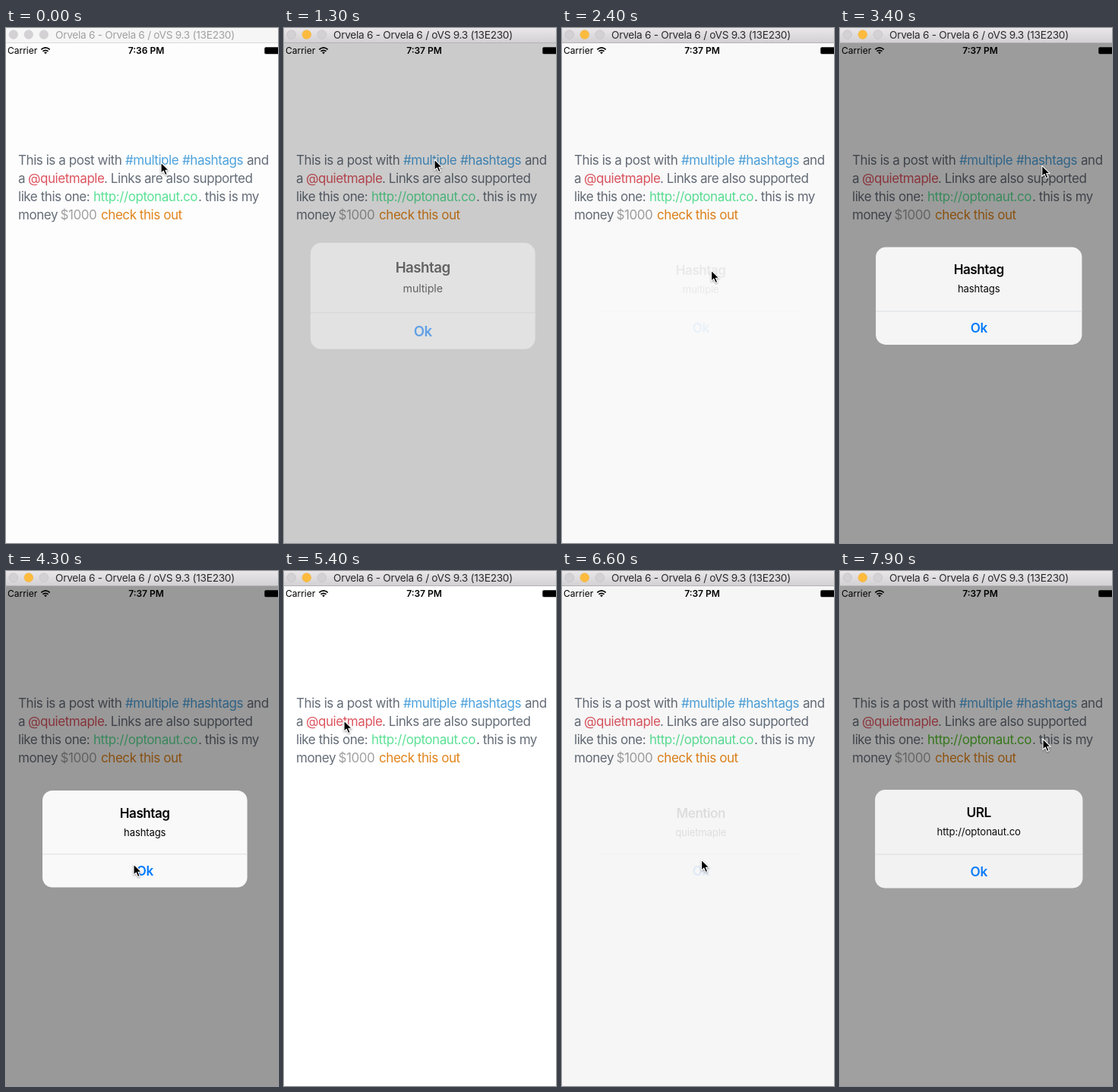
An HTML page that plays this animation: 358 px wide and 678 px high, repeating every 8000 ms.

```html
<!DOCTYPE html>
<html lang="en">
<head>
<meta charset="utf-8">
<style>
  html, body { margin: 0; width: 100%; height: 100%; overflow: hidden; background: #fff; }
  svg { display: block; font-family: Inter, Roboto, sans-serif; }
  text { white-space: pre; }
  #post { font-size: 17px; letter-spacing: -.44px; fill: #656d78; }
  #post .tag { fill: #4ea2dc; }
  #post .mention { fill: #dd5560; }
  #post .url { fill: #5ce196; }
  #post .money { fill: #a0a0a0; }
  #post .link { fill: #e1841c; }
  #title { font-size: 13.6px; letter-spacing: -.25px; }
  #status { font-size: 12px; }
  #alert { text-anchor: middle; }
  #alert .big { font-size: 17px; font-weight: 600; letter-spacing: -.43px; }
  #message { font-size: 13px; letter-spacing: -.1px; }
</style>
</head>
<body>
<svg width="358" height="678" viewBox="0 0 358 678">
  <defs>
    <linearGradient id="bar" x2="0" y2="1">
      <stop stop-color="#e9e7e9"/><stop offset="1" stop-color="#d2d0d2"/>
    </linearGradient>
  </defs>
  <rect id="screen" width="358" height="678"/>

  <g id="post">
    <text x="16" y="179.5">This is a post with</text>
    <text x="157" y="179.5" class="tag">#multiple</text>
    <text x="232" y="179.5" class="tag">#hashtags</text>
    <text x="317" y="179.5">and</text>
    <text x="16" y="203.7">a</text>
    <text x="29" y="203.7" class="mention">@quietmaple</text>
    <text x="129" y="203.7">. Links are also supported</text>
    <text x="16" y="227.9">like this one:</text>
    <text x="115" y="227.9" class="url" id="url">http://optonaut.co</text>
    <text x="253" y="227.9">. this is my</text>
    <text x="16" y="252">money</text>
    <text x="71.6" y="252" class="money">$1000</text>
    <text x="125" y="252" class="link">check this out</text>
  </g>

  <rect id="dim" y="20" width="358" height="658"/>

  <g id="status">
    <text x="2" y="34">Carrier</text>
    <g fill="none" stroke="#000" stroke-width="1.7">
      <path d="M46.3 28.3q5.7-4.8 11.4 0M48.4 30.7q3.6-2.8 7.2 0"/>
      <path d="M52 34.3l-2-2.2q2-1.3 4 0z" fill="#000" stroke="none"/>
    </g>
    <text id="clock" x="184.5" y="34" text-anchor="middle" font-weight="600"></text>
    <rect x="340.5" y="25.5" width="24" height="8.5" rx="1.5" stroke="#000" stroke-opacity=".45"/>
  </g>

  <rect id="titlebar" width="358" height="19.5"/>
  <path id="edge" d="M0 19.5H358"/>
  <g id="lights">
    <circle cx="9.8" cy="8.6" r="5.8"/>
    <circle cx="29.8" cy="8.6" r="5.8"/>
    <circle cx="49.8" cy="8.6" r="5.8"/>
  </g>
  <text id="title" x="65" y="14">Orvela 6 - Orvela 6 / oVS 9.3 (13E230)</text>

  <g id="alert">
    <rect x="48" y="289" width="269.5" height="127.5" rx="13" fill="#f9f9f9"/>
    <path d="M48 372.8H317.5" stroke="#dedfe4" stroke-width="1"/>
    <text id="heading" class="big" x="182.7" y="324.5"></text>
    <text id="message" x="182.7" y="348.5"></text>
    <text class="big" x="182.7" y="401" fill="#007aff">Ok</text>
  </g>

  <path id="cursor" d="M0 0V14.2L3.3 11.2L5.6 16.6L8.2 15.5L5.9 10.3H10.4Z"
    stroke="#fff" stroke-width="1.1" stroke-linejoin="round"
    style="filter: drop-shadow(0 1px 1px rgba(0,0,0,.35))"/>
</svg>
<script>
const $ = id => document.getElementById(id);
const LOOP = 8000, ACTIVE_AT = 1000, URL_PRESS = 7620;

// opening time, closing time, heading, message
const alerts = [
  [1215, 2175, 'Hashtag', 'multiple'],
  [3140, 4400, 'Hashtag', 'hashtags'],
  [5420, 6402, 'Mention', 'quietmaple'],
  [7685, 9000, 'URL', 'http://optonaut.co']
];

// time, x, y of the pointer tip
const path = [
  [0, 204, 177], [900, 198, 173], [1400, 198, 173], [1950, 184, 392],
  [2200, 186, 390], [2400, 196.5, 319], [2900, 268, 176], [3350, 268, 176],
  [3900, 176, 390], [4300, 168, 386], [4450, 168, 386], [5000, 95, 215],
  [5200, 79, 197], [5600, 79, 197], [6100, 186, 392], [6450, 186, 390],
  [6600, 183.5, 380], [7150, 250, 235], [7500, 267, 221], [8000, 267, 221]
];

// critically damped spring from 0 to 1
const spring = ms => ms <= 0 ? 0 : 1 - Math.exp(-.02 * ms) * (1 + .02 * ms);

function set(id, attrs) {
  for (const key in attrs) $(id).setAttribute(key, attrs[key]);
}

function pointer(t) {
  const i = path.findIndex(p => p[0] > t);
  const [t0, x0, y0] = path[i - 1], [t1, x1, y1] = path[i];
  const u = (t - t0) / (t1 - t0), e = u * u * (3 - 2 * u);
  return [x0 + (x1 - x0) * e, y0 + (y1 - y0) * e];
}

function drawWindow(active) {
  set('screen', { fill: active ? '#fff' : '#fdfdfd' });
  set('titlebar', { fill: active ? 'url(#bar)' : '#f6f6f6' });
  set('edge', { stroke: active ? '#b4b2b4' : '#d8d8d8' });
  set('title', { fill: active ? '#2a2a2a' : '#a0a0a0' });
  [...$('lights').children].forEach((light, i) => {
    const amber = active && i === 1;
    light.setAttribute('fill', amber ? '#fdbb3e' : '#d3d1d3');
    light.setAttribute('stroke', amber ? '#f0b03a' : active ? '#bfbdbf' : '#d0d0d0');
    light.setAttribute('stroke-width', .6);
  });
  $('clock').textContent = active ? '7:37 PM' : '7:36 PM';
}

function drawAlert(t) {
  const current = alerts.filter(a => a[0] <= t).pop();
  if (!current) {
    set('alert', { opacity: 0 });
    set('dim', { opacity: 0 });
    return;
  }
  const [open, close, heading, message] = current;
  const shown = spring(t - open);
  const alpha = shown * (1 - spring(t - close));
  const scale = 1.2 - .2 * shown;
  $('heading').textContent = heading;
  $('message').textContent = message;
  set('alert', {
    opacity: alpha,
    transform: `translate(182.7 352.7) scale(${scale}) translate(-182.7 -352.7)`
  });
  set('dim', { opacity: .4 * alpha });
}

function frame(now) {
  const t = now % LOOP;
  drawWindow(t >= ACTIVE_AT);
  drawAlert(t);
  $('url').style.fill = t >= URL_PRESS ? 'rgb(82,190,41)' : '';
  set('cursor', { transform: `translate(${pointer(t)})` });
  requestAnimationFrame(frame);
}
frame(0);
</script>
</body>
</html>
```
